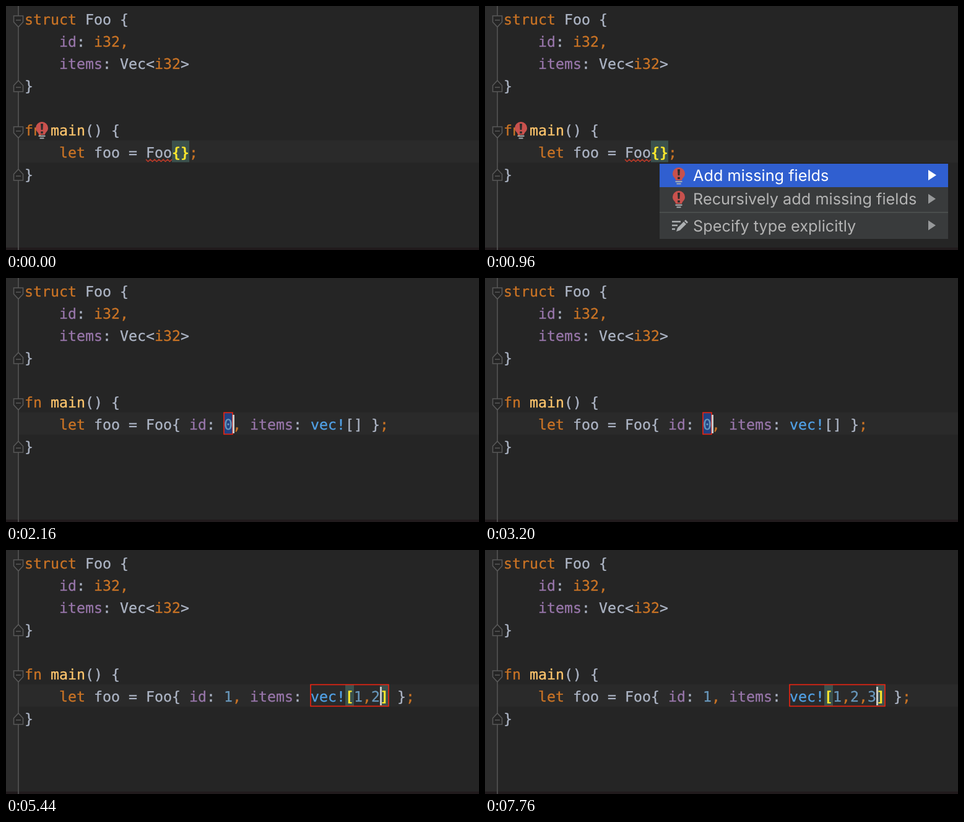
These frames come from a looping animation (764 px wide and 396 px high, 7840 ms). An HTML page:

```html
<!DOCTYPE html>
<html lang="en">
<head>
<meta charset="utf-8">
<title>Code completion</title>
<style>
  html, body { margin: 0; width: 100%; height: 100%; overflow: hidden; background: #252525; }
  svg { display: block; width: 764px; height: 396px; }
  text { white-space: pre; text-rendering: geometricPrecision; }
  .code text { font: 23.25px "DejaVu Sans Mono", monospace; stroke-width: .3; }
  .code .bold { font-weight: bold; stroke-width: 0; }
  .menu text { font: 25.3px Inter, sans-serif; fill: #b4b4b4; }
</style>
</head>
<body>
<svg viewBox="0 0 764 396">
  <defs>
    <g id="bulb">
      <path d="M-5 10C-5 6-10 5-10-1A10 10 0 0 1 10-1C10 5 5 6 5 10Z" fill="#c8514d"/>
      <path d="M-2-8H2L1.4 2H-1.4ZM-1.8 4.5H1.8V8H-1.8Z" fill="#2b2b2b"/>
      <path d="M-5.5 12H5.5M-3.5 15.5H3.5" stroke="#a9adb0" stroke-width="2"/>
    </g>
    <path id="fold" d="M-7.5-9H7.5V1L0 9L-7.5 1ZM-4-2H4" fill="#252525" stroke="#585858" stroke-width="1.6"/>
  </defs>
  <rect width="764" height="396" fill="#252525"/>
  <rect width="19" height="396" fill="#2c2c2c"/>
  <rect x="21" y="218" width="743" height="36" fill="#2a2a2a"/>
  <rect y="392" width="764" height="4" fill="#211b1d"/>
  <path d="M20 0V396" stroke="#555" stroke-width="1.6"/>
  <use href="#fold" x="20" y="25"/>
  <use href="#fold" x="20" y="205"/>
  <use href="#fold" transform="translate(20 130)scale(1 -1)"/>
  <use href="#fold" transform="translate(20 274)scale(1 -1)"/>
  <g class="code" id="fixed"></g>
  <g class="code" id="edited"></g>
  <g id="warning">
    <path id="squiggle" fill="none" stroke="#c03a28" stroke-width="1.5"/>
    <use href="#bulb" x="58" y="199"/>
  </g>
  <rect id="caret" y="222" width="3" height="30" fill="#c8c8c8"/>
  <g class="menu" id="menu">
    <rect x="282" y="256" width="466" height="122" fill="#393b3c"/>
    <rect x="282" y="256" width="466" height="38" fill="#305fd0"/>
    <path d="M282 335H748" stroke="#505453" stroke-width="1.5"/>
    <use href="#bulb" x="313" y="273"/>
    <use href="#bulb" x="313" y="311"/>
    <g stroke="#adb0b2" stroke-width="2.4" fill="#adb0b2">
      <path d="M302 350H316M302 356H311M302 362H307"/>
      <path d="M309 366L311 360L321 350L325 354L315 364Z" stroke="none"/>
      <path d="M322 349L324 347L328 351L326 353Z" stroke="none"/>
    </g>
    <text x="336" y="284" style="fill:#fff">Add missing fields</text>
    <text x="336" y="322">Recursively add missing fields</text>
    <text x="336" y="366">Specify type explicitly</text>
    <path d="M716 266V283L729 274.5Z" fill="#fff"/>
    <path d="M716 305V321L728 313ZM716 348V364L728 356Z" fill="#97999a"/>
  </g>
</svg>
<script>
const LOOP = 7840, STEP = 80, BLINK = 480;
const CELL = 14, LEFT = 30, LINE = 36, ROW = 6;
const PLAIN = '#adb5c5', KEY = '#cb7425', FIELD = '#9876aa', NUM = '#6897bb',
      MACRO = '#51a1e6', NAME = '#ffc66d', BRACE = '#ffe92c';
const $ = id => document.getElementById(id);
const colX = col => LEFT + col * CELL;

const box = (col, cells, style) =>
  `<rect x="${colX(col)}" y="218.5" width="${cells * CELL}" height="35" ${style}/>`;

// Tokens are [text, colour]; columns follow from the text lengths.
function codeLine(row, col, tokens) {
  let out = '';
  for (const [text, color] of tokens) {
    const bold = color === BRACE;
    if (bold) out += box(col, text.length, 'fill="#3b514d"');
    const safe = text.replace(/</g, '&lt;');
    out += `<text x="${colX(col)}" y="${30 + row * LINE}" fill="${color}" stroke="${color}"${bold ? ' class="bold"' : ''}>${safe}</text>`;
    col += text.length;
  }
  return out;
}

$('fixed').innerHTML = [
  [0, 0, [['struct', KEY], [' Foo {', PLAIN]]],
  [1, 4, [['id', FIELD], [': ', PLAIN], ['i32,', KEY]]],
  [2, 4, [['items', FIELD], [': Vec<', PLAIN], ['i32', KEY], ['>', PLAIN]]],
  [3, 0, [['}', PLAIN]]],
  [5, 0, [['fn ', KEY], ['main', NAME], ['() {', PLAIN]]],
  [6, 4, [['let', KEY], [' foo = Foo', PLAIN]]],
  [7, 0, [['}', PLAIN]]]
].map(args => codeLine(...args)).join('');

let zigzag = 'M226 249';
for (let x = 229.5, i = 0; x <= 268; x += 3.5, i++) zigzag += `L${x} ${i % 2 ? 249 : 252.5}`;
$('squiggle').setAttribute('d', zigzag);

// Each edit: start time, id value, list items, edited field, caret column.
const edits = [
  { at: 0, menu: false },
  { at: 80, menu: true },
  { at: 1040, menu: false },
  { at: 1200, id: '0', items: '', field: 'id', caret: 24 },
  { at: 3280, id: '1', items: '', field: 'id', caret: 24 },
  { at: 4000, id: '1', items: '', field: 'items', caret: 39 },
  { at: 4720, id: '1', items: '', field: 'items', caret: 38 },
  ...['1', '1,', '1,2', '1,2,', '1,2,3'].map((items, i) => ({
    at: [4960, 5120, 5360, 5600, 5840][i], id: '1', items, field: 'items', caret: 38 + items.length
  }))
];

function drawEdit({ id, items, field }) {
  if (!id) return codeLine(ROW, 17, [['{}', BRACE], [';', KEY]]);
  const inList = field === 'items', bracket = inList ? BRACE : PLAIN;
  const list = [...items].map(c => [c, c === ',' ? KEY : NUM]);
  const selected = id === '0' ? box(23, 1, 'fill="#214283"') : '';
  const frame = inList ? [33, 6 + items.length] : [23, 1];
  return selected + codeLine(ROW, 17, [
    ['{ ', PLAIN], ['id', FIELD], [': ', PLAIN], [id, NUM], [', ', KEY],
    ['items', FIELD], [': ', PLAIN], ['vec!', MACRO],
    ['[', bracket], ...list, [']', bracket], [' }', PLAIN], [';', KEY]
  ]) + box(...frame, 'fill="none" stroke="#ee2411" stroke-width="1.6"');
}

const show = (id, on) => $(id).setAttribute('visibility', on ? 'visible' : 'hidden');
let current;

function render(ms) {
  const t = Math.floor(ms % LOOP / STEP) * STEP;
  const edit = edits.findLast(e => e.at <= t);
  if (edit !== current) {
    current = edit;
    $('edited').innerHTML = drawEdit(edit);
    show('menu', edit.menu);
    show('warning', !edit.id);
    if (edit.caret) $('caret').setAttribute('x', colX(edit.caret));
  }
  show('caret', edit.caret && (t - edit.at) % (2 * BLINK) < BLINK);
}

let start;
function tick(now) {
  start ??= now;
  render(now - start);
  requestAnimationFrame(tick);
}
render(0);
requestAnimationFrame(tick);
</script>
</body>
</html>
```
